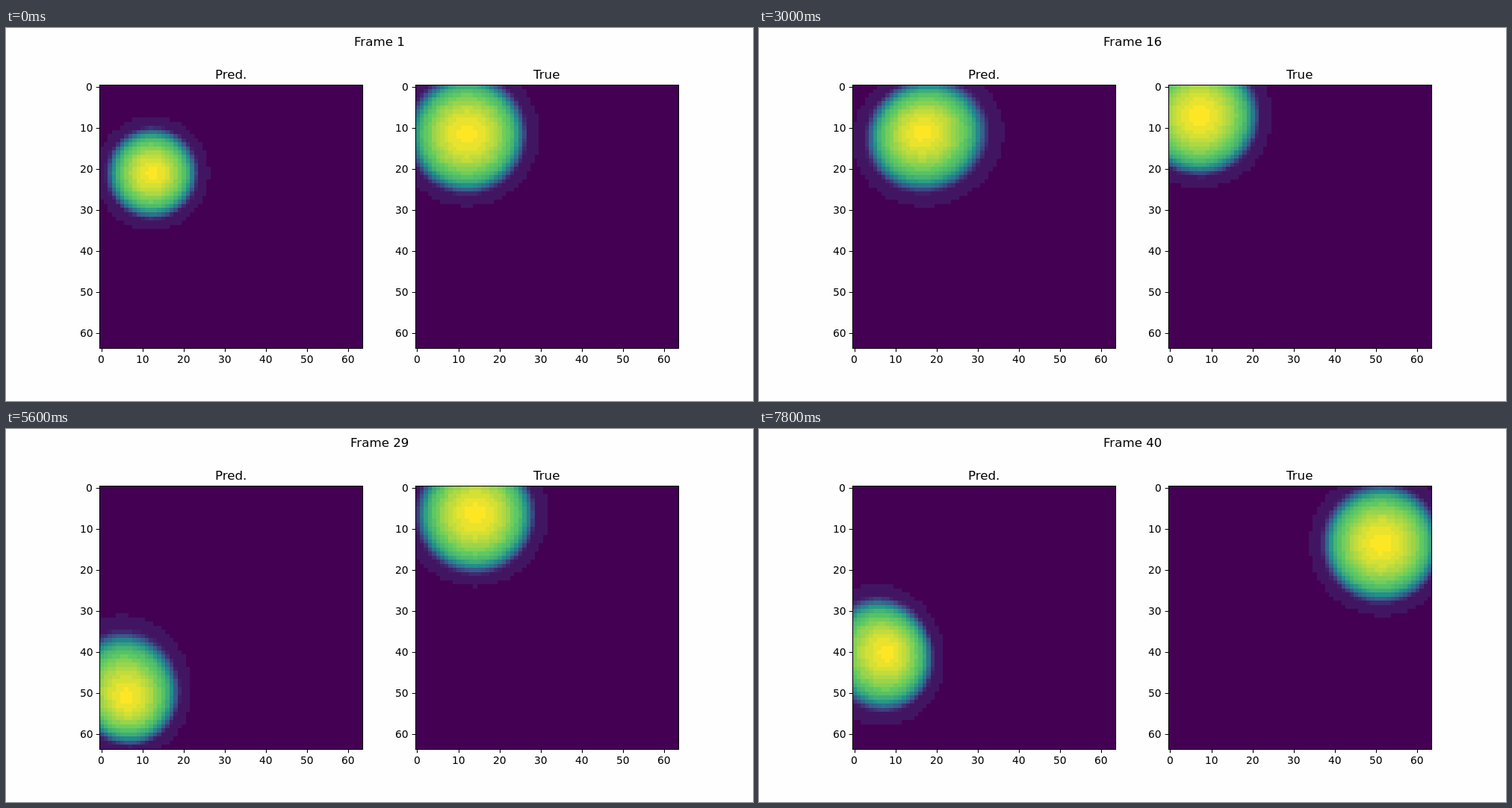
Recreate the animation shown at these times as an HTML page with a canvas. Size 1000x500 px, loop 8000 ms.

```html
<!DOCTYPE html>
<html lang="en">
<head>
<meta charset="utf-8">
<title>Prediction and truth</title>
<style>
  html, body { margin: 0; width: 100%; height: 100%; overflow: hidden; background: #fefefe; }
  canvas, svg { position: absolute; left: 0; top: 0; width: 1000px; height: 500px; }
  text { font: 13.89px "DejaVu Sans", sans-serif; fill: #000; }
  .title { font-size: 16.67px; }
  path { fill: none; stroke: #000; stroke-width: 1.11; }
</style>
</head>
<body>
<canvas id="heat" width="1000" height="500"></canvas>
<svg id="chart" viewBox="0 0 1000 500"></svg>
<script>
const STEP_MS = 200, STEPS = 40, GRID = 64;
const LEFT = 125, RIGHT = 547.73, TOP = 76.36, SIDE = 352.27;
const IMAGE = 353, RADIUS = 17.6, LEVELS = 32;
const chart = document.getElementById('chart');
const ctx = document.getElementById('heat').getContext('2d');

const mix = (a, b, t) => a + (b - a) * t;

const STOPS = [[68, 1, 84], [59, 82, 139], [33, 145, 140], [94, 201, 98], [253, 231, 37]];
const palette = Array.from({ length: LEVELS + 1 }, (_, n) => {
  const pos = n / LEVELS * (STOPS.length - 1);
  const i = Math.min(Math.floor(pos), STOPS.length - 2);
  return `rgb(${STOPS[i].map((c, k) => Math.round(mix(c, STOPS[i + 1][k], pos - i))).join()})`;
});

// A dome with a soft edge and a faint halo that ends at RADIUS.
function level(r) {
  if (r > RADIUS) return 0;
  const dome = (1 - (r / 20) ** 2) / (1 + Math.exp((r - 13.7) / .8));
  return Math.round(Math.max(.06, dome) * LEVELS);
}

// Key points of the predicted peak: step, x, y.
const PATH = [[0, 12.3, 21], [5, 27.8, 18.6], [15, 16.3, 11], [18, 14, 22], [20, 4.5, 39],
  [21, 4.8, 34.4], [28, 6.2, 51.3], [33, 5, 28.5], [35, 4.5, 30.3], [37, 5, 41], [39, 7.8, 40]];

function peakAt(step) {
  const i = Math.max(1, PATH.findIndex(p => p[0] >= step));
  const [s0, x0, y0] = PATH[i - 1], [s1, x1, y1] = PATH[i];
  const t = Math.max(0, (step - s0) / (s1 - s0));
  return [mix(x0, x1, t), mix(y0, y1, t)];
}

// Tilted ellipses; the outer ones trail behind the peak.
function predicted(step) {
  const [px, py] = peakAt(step), [cx, cy] = peakAt(step - 1.3);
  const grow = 1 - .2 * Math.exp(-step);
  const rx = (14.8 + .2 * cx) * grow, ry = 17.2 * grow, tilt = .12 - .01 * cx;
  return (x, y) => {
    let d = 1;
    for (let n = 0; n < 5; n++) {
      const t = Math.min(1, d);
      const u = (x - mix(px, cx, t)) / rx, v = (y - mix(py, cy, t)) / ry;
      d = Math.sqrt((u * u + v * v - 2 * tilt * u * v) / (1 - tilt * tilt));
    }
    return RADIUS * d ** .9;
  };
}

// Folds a straight path into a bounce between the first and last cell.
function bounce(p) {
  const span = GRID - 1, m = ((p % (2 * span)) + 2 * span) % (2 * span);
  return m > span ? 2 * span - m : m;
}

function truth(step) {
  const cx = bounce(12 + 8.07 * step), cy = bounce(11.5 - 9.64 * step);
  return (x, y) => Math.hypot(x - cx, y - cy);
}

function drawMap(left, distance) {
  const edge = (origin, i) => Math.round(Math.round(origin) + i * IMAGE / GRID);
  ctx.fillStyle = palette[0];
  ctx.fillRect(edge(left, 0), edge(TOP, 0), IMAGE, IMAGE);
  for (let y = 0; y < GRID; y++) {
    for (let x = 0; x < GRID; x++) {
      const value = level(distance(x, y));
      if (!value) continue;
      const x0 = edge(left, x), y0 = edge(TOP, y);
      ctx.fillStyle = palette[value];
      ctx.fillRect(x0, y0, edge(left, x + 1) - x0, edge(TOP, y + 1) - y0);
    }
  }
}

function add(tag, attrs) {
  const node = document.createElementNS('http://www.w3.org/2000/svg', tag);
  for (const name in attrs) node.setAttribute(name, attrs[name]);
  return chart.appendChild(node);
}

// Starts the text on a whole pixel; align is the share of its width left of x.
function setText(node, label, x, align = .5) {
  node.textContent = label;
  node.setAttribute('x', Math.round(x - align * node.getComputedTextLength()));
}

function drawAxes(left, title) {
  const snap = v => Math.floor(v + .5) + .5;
  const x0 = snap(left), x1 = snap(left + SIDE), y0 = snap(TOP), y1 = snap(TOP + SIDE);
  let d = `M${x0} ${y0}H${x1}V${y1}H${x0}Z`;
  for (let n = 0; n <= 60; n += 10) {
    const offset = (n + .5) * SIDE / GRID, x = left + offset, y = TOP + offset;
    d += `M${snap(x)} ${y1}v4.86M${x0} ${snap(y)}h-4.86`;
    setText(add('text', { y: 449 }), n, x);
    setText(add('text', { y: Math.round(y + 5) }), n, left - 8.8, 1);
  }
  add('path', { d });
  setText(add('text', { y: 68, class: 'title' }), title, left + SIDE / 2);
}

const heading = add('text', { y: 24, class: 'title' });
drawAxes(LEFT, 'Pred.');
drawAxes(RIGHT, 'True');

const start = performance.now();
let shown = -1;
function render() {
  const step = Math.floor((performance.now() - start) / STEP_MS) % STEPS;
  if (step !== shown) {
    shown = step;
    setText(heading, `Frame ${step + 1}`, 500);
    drawMap(LEFT, predicted(step));
    drawMap(RIGHT, truth(step));
  }
  requestAnimationFrame(render);
}
render();
</script>
</body>
</html>
```
